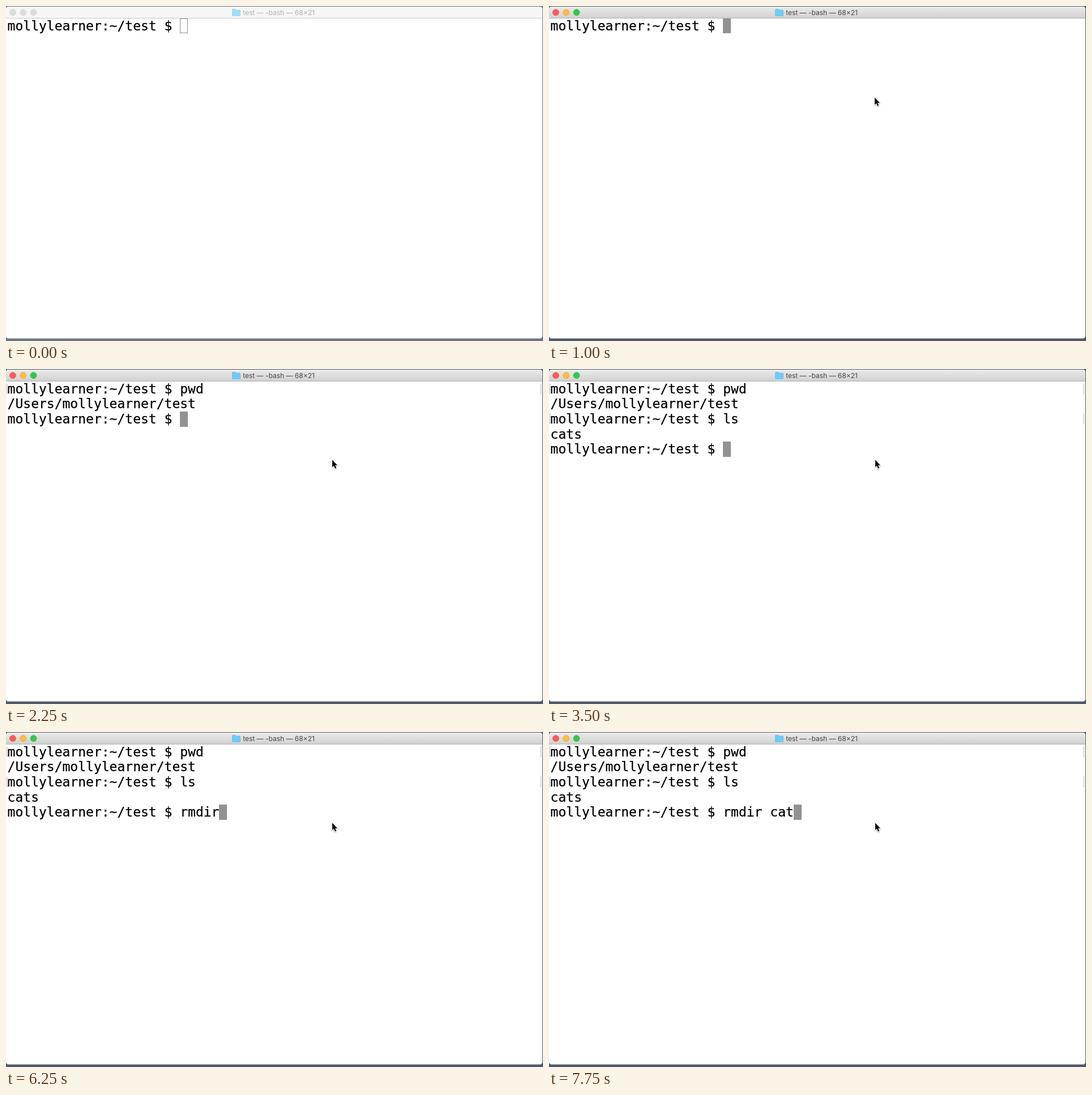
Write an HTML page that moves like this. It is 948 px wide and 591 px high and loops after 8000 ms.

```html
<!DOCTYPE html>
<html lang="en">
<head>
<meta charset="utf-8">
<title>Terminal session</title>
<style>
  html, body { margin: 0; width: 100%; height: 100%; overflow: hidden; background: #6c7584; }
  svg { display: block; width: 948px; height: 591px; }
  .desk { fill: #6c7584; }
  .bar { fill: #f6f6f6; }
  .rule { fill: #c9c9c9; }
  .light { fill: #dcdcdc; stroke: #cfcfcf; stroke-width: .6; }
  .folder { fill: #a5dbf6; stroke: #8fc9e6; stroke-width: .6; }
  .title { font: 12px Inter, sans-serif; fill: #b0b0b0; text-anchor: middle; }
  .on .desk { fill: #505968; }
  .on .bar { fill: url(#metal); }
  .on .rule { fill: #b1b1b1; }
  .on .folder { fill: #6fcbf7; stroke: #55b3e0; }
  .on .title { fill: #454545; }
  .on .red { fill: #fc5b57; stroke: #e2463f; }
  .on .amber { fill: #fdbc40; stroke: #e0a028; }
  .on .green { fill: #34c84a; stroke: #24ab35; }
  #screen text {
    font: 23px "DejaVu Sans Mono", monospace;
    fill: #000; stroke: #000; stroke-width: .25; white-space: pre;
  }
  #screen path { fill: none; stroke: #b4b4b4; }
  #cursor { fill: #fff; stroke: #929292; }
  .on #cursor { fill: #929292; }
  #mouse { filter: drop-shadow(0 1px 1px rgba(0, 0, 0, .35)); }
  #mouse path { fill: #000; stroke: #fff; stroke-width: 1.6; paint-order: stroke; }
</style>
</head>
<body>
<svg id="stage" viewBox="0 0 948 591">
  <defs>
    <linearGradient id="metal" x2="0" y2="1">
      <stop stop-color="#ebebeb"/>
      <stop offset="1" stop-color="#d1d1d1"/>
    </linearGradient>
  </defs>
  <rect class="desk" width="948" height="591"/>
  <rect y="1" width="947" height="585.5" rx="4.5" fill="#fff"/>
  <path class="bar" d="M0 21V5.5A4.5 4.5 0 0 1 4.5 1H942.5A4.5 4.5 0 0 1 947 5.5V21Z"/>
  <rect class="rule" y="21" width="947" height="1"/>
  <circle class="light red" cx="12" cy="11.3" r="5.5"/>
  <circle class="light amber" cx="30.3" cy="11.3" r="5.5"/>
  <circle class="light green" cx="48.6" cy="11.3" r="5.5"/>
  <path class="folder" d="M399.5 6.5Q399.5 5.5 400.5 5.5H404.5L406 7H412.5Q413.5 7 413.5 8V16.5Q413.5 17.5 412.5 17.5H400.5Q399.5 17.5 399.5 16.5Z"/>
  <text class="title" x="481.5" y="16">test — -bash — 68×21</text>
  <g id="screen"></g>
  <rect id="cursor"/>
  <g id="mouse"><path d="M0 0V12.6L2.9 9.9 5 15 7.1 14.1 5 9.2H8.9Z"/></g>
</svg>
<script>
  const LOOP = 8000, CELL = 13.846, LEFT = 2.6, TOP = 21.8, PITCH = 26.6;
  const USER = 'mollylearner';
  const PROMPT = USER + ':~/test $ ';
  const OUTPUT = { pwd: '/Users/' + USER + '/test', ls: 'cats' };

  // Typed input over time; "|" is the return key.
  const typing = [
    [0, ''], [1750, 'p'], [2000, 'pwd'], [2250, 'pwd|'],
    [2750, 'pwd|l'], [3250, 'pwd|ls'], [3500, 'pwd|ls|'],
    [5750, 'pwd|ls|rmd'], [6000, 'pwd|ls|rmdi'], [6250, 'pwd|ls|rmdir'],
    [6750, 'pwd|ls|rmdir '], [7250, 'pwd|ls|rmdir'],
    [7500, 'pwd|ls|rmdir ca'], [7750, 'pwd|ls|rmdir cat']
  ];
  const mouseStops = [
    [0, null], [500, [669, 131.5]], [750, [573.5, 163.5]],
    [1000, [575, 161.5]], [1250, [576, 160.5]]
  ];

  const $ = id => document.getElementById(id);
  const at = (steps, t) => steps.filter(s => s[0] <= t).pop()[1];
  const setAttrs = (el, attrs) => {
    for (const key in attrs) el.setAttribute(key, attrs[key]);
  };

  function add(tag, attrs, text = '') {
    const el = document.createElementNS('http://www.w3.org/2000/svg', tag);
    setAttrs(el, attrs);
    el.textContent = text;
    $('screen').append(el);
  }

  function addLine(row, text) {
    add('text', { x: LEFT, y: Math.round(42.7 + PITCH * row) }, text);
  }

  function addMarks(row) {
    const y = Math.round(TOP + PITCH * row) + 4.5;
    add('path', { d: `M3 ${y}H1.5v17H3M943 ${y}h1.5v17H943` });
  }

  function drawSession(input, active) {
    const commands = input.split('|');
    const current = commands.pop();
    let row = 0;
    $('screen').replaceChildren();
    for (const command of commands) {
      addMarks(row);
      addLine(row++, PROMPT + command);
      addLine(row++, OUTPUT[command]);
    }
    addLine(row, PROMPT + current);

    const col = PROMPT.length + current.length;
    const x = Math.round(LEFT + CELL * col), right = Math.round(LEFT + CELL * (col + 1));
    const y = Math.round(TOP + PITCH * row), bottom = Math.round(TOP + PITCH * (row + 1));
    setAttrs($('cursor'), { x: x + .5, y: y + .5, width: right - x - 1, height: bottom - y - 1 });
    $('stage').classList.toggle('on', active);
  }

  let shown;
  function draw(now) {
    const t = now % LOOP, input = at(typing, t), active = t >= 1000;
    const state = input + active;
    if (state !== shown) drawSession(input, active);
    shown = state;

    const pos = at(mouseStops, t);
    $('mouse').style.display = pos ? '' : 'none';
    if (pos) setAttrs($('mouse'), { transform: `translate(${pos})` });
  }

  const start = performance.now();
  function tick() {
    draw(performance.now() - start);
    requestAnimationFrame(tick);
  }
  tick();
</script>
</body>
</html>
```
